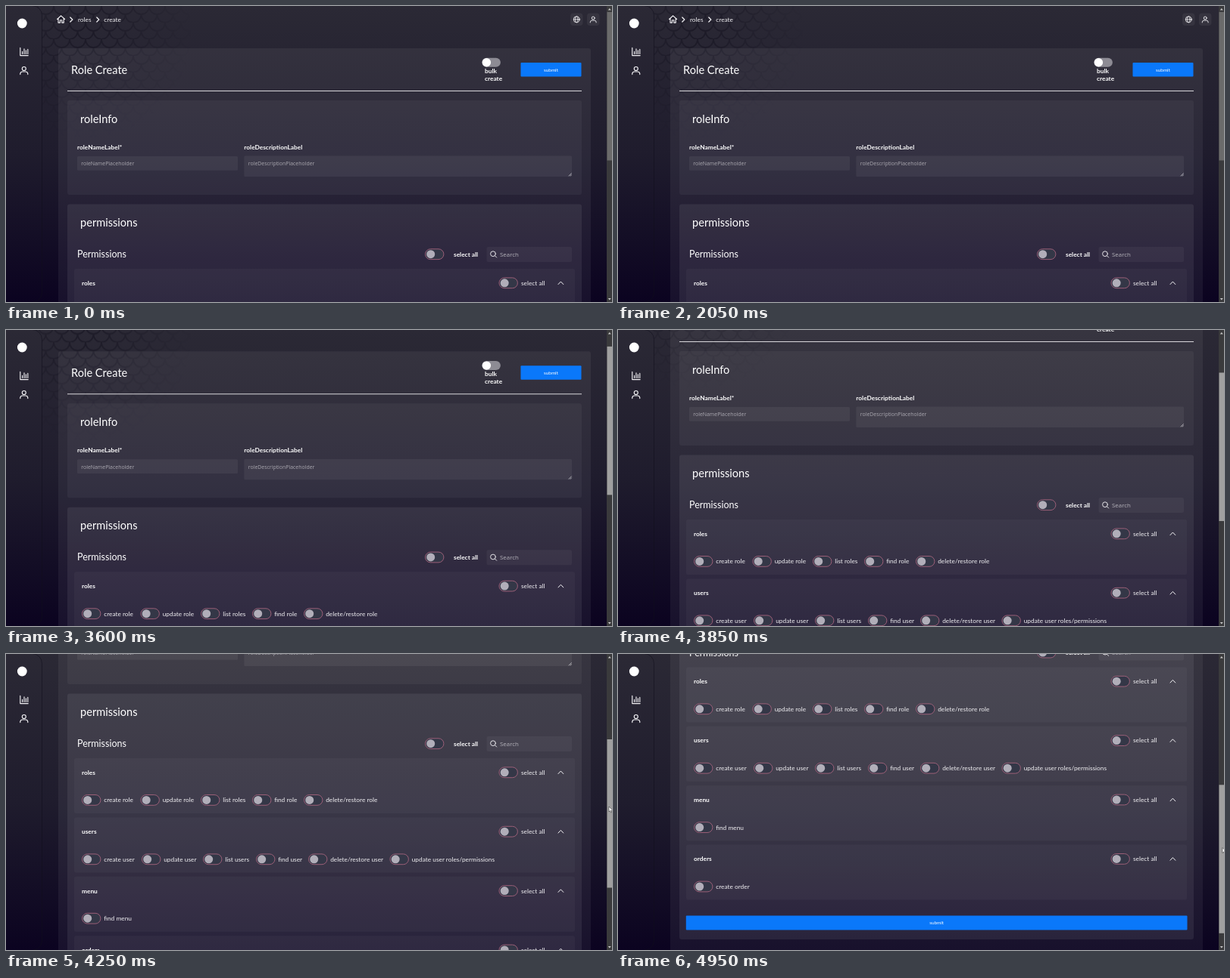
An HTML page that plays this animation: 800x392 px, repeating every 5 s.

```html
<!DOCTYPE html>
<html lang="en">
<head>
<meta charset="utf-8">
<title>Role Create</title>
<style>
  html, body { margin: 0; width: 100%; height: 100%; overflow: hidden; background: #1e1b2c; }
  svg { display: block; width: 800px; height: 392px; }
  text { font: 8.33px Lato, sans-serif; fill: #f1f0f3; white-space: pre; }
  .b { font-weight: 700; fill: #fff; }
  .h { font-size: 14.6px; fill: #fff; }
  .h2 { font-size: 12.5px; fill: #fff; }
  .ph { font: 6.93px "Open Sans", sans-serif; fill: #aaa8b0; }
  .find { font: 7.9px "Open Sans", sans-serif; fill: #b4b2ba; }
  .btn { font-size: 6.35px; fill: #fff; text-anchor: middle; }
  .line { fill: none; stroke: #f4f3f6; stroke-width: 1.15; stroke-linecap: round; stroke-linejoin: round; }
</style>
</head>
<body>
<svg viewBox="0 0 800 392">
  <defs>
    <linearGradient id="bg" gradientUnits="userSpaceOnUse" x1="0" y1="0" x2="0" y2="392">
      <stop offset="0" stop-color="#2b2935"/>
      <stop offset=".5" stop-color="#1f1c2d"/>
      <stop offset="1" stop-color="#0b0320"/>
    </linearGradient>
    <radialGradient id="fade" gradientUnits="userSpaceOnUse" cx="105" cy="35" r="140">
      <stop offset="0" stop-color="#fff"/>
      <stop offset="1" stop-color="#000"/>
    </radialGradient>
    <mask id="soft"><rect width="260" height="190" fill="url(#fade)"/></mask>
    <pattern id="scales" width="21" height="22" patternUnits="userSpaceOnUse">
      <path d="M0 0a10.5 11 0 0 0 21 0M-10.5 11a10.5 11 0 0 0 21 0M10.5 11a10.5 11 0 0 0 21 0"
        fill="none" stroke="#14121f" stroke-width="1.8"/>
    </pattern>
  </defs>
  <rect width="800" height="392" fill="url(#bg)"/>
  <g id="page"></g>
  <g id="fixed"></g>
  <rect id="thumb" x="793.5" y="8" width="6.5" height="196.5"/>
  <path id="cursor" d="M0 0v7l1.6-1.5 1.1 2.5 1.2-.5-1.1-2.4h2.2z" fill="#fff" stroke="#222" stroke-width=".5"/>
</svg>
<script>
const LOOP = 5000, STEP = 50, DRAG_START = 3500;
const $ = id => document.getElementById(id);

const rect = (x, y, w, h, fill, r = 2.5) =>
  `<rect x="${x}" y="${y}" width="${w}" height="${h}" rx="${r}" fill="${fill}"/>`;
const glass = (x, y, w, h, a, r) => rect(x, y, w, h, `rgba(255,255,255,${a})`, r);
const text = (s, x, y, cls = "") => `<text x="${x}" y="${y}" class="${cls}">${s}</text>`;
const line = (d, w = 1.15) => `<path class="line" d="${d}" style="stroke-width:${w}"/>`;
const toggle = (x, y) =>
  `<rect x="${x + .5}" y="${y - 6.9}" width="24.4" height="13.8" rx="6.9" fill="#343747" stroke="#a5647d" stroke-width=".9"/>
   <circle cx="${x + 7.7}" cy="${y}" r="5.5" fill="#b1aeb9"/>`;
const person = (x, y, s = 1) =>
  `<g transform="translate(${x} ${y}) scale(${s})"><circle class="line" cy="-2.6" r="2.5"/>${line("M-5 5v-1a3 3 0 0 1 3-2.6h4a3 3 0 0 1 3 2.6v1")}</g>`;

const groups = [
  ["roles", [[100, "create role"], [177.5, "update role"], [257, "list roles"], [325, "find role"], [393, "delete/restore role"]]],
  ["users", [[100, "create user"], [179, "update user"], [260, "list users"], [330, "find user"], [399, "delete/restore user"], [506.5, "update user roles/permissions"]]],
  ["menu", [[100, "find menu"]]],
  ["orders", [[100, "create order"]]]
];

const group = ([name, items], i) => {
  const y = 348 + i * 78.4;
  return glass(90, y, 661, 73, .032) +
    text(name, 100, y + 21.7, "b") +
    toggle(650.5, y + 18.8) + text("select all", 680, y + 21.7) +
    line(`M729 ${y + 20.6}l3.4-3.6 3.4 3.6`, 1) +
    items.map(([x, s]) => toggle(x, y + 55.4) + text(s, x + 29.2, y + 58.4)).join("");
};

const header =
  `<rect width="260" height="190" fill="url(#scales)" mask="url(#soft)" opacity=".6"/>` +
  line("M67.6 17.5l5-4.6 5 4.6M69 16.5v5.6h2.4v-3.4h2.4v3.4h2.4v-5.6") +
  line("M84.8 15l3 3-3 3M119.8 15l3 3-3 3", 1.2) +
  text("roles", 95, 21) + text("create", 129.3, 21) +
  glass(745, 9.5, 16.5, 16.5, .06, 4) + glass(767, 9.5, 16.5, 16.5, .06, 4) +
  `<circle class="line" cx="753.3" cy="17.8" r="4" style="stroke-width:.9"/>` +
  `<ellipse class="line" cx="753.3" cy="17.8" rx="1.8" ry="4" style="stroke-width:.8"/>` +
  line("M749.3 17.8h8", .8) + person(775.2, 18, .78);

const form =
  glass(69, 56, 703, 690, .055, 3) +
  text("Role Create", 86, 89.8, "h") +
  rect(628.3, 68.8, 24.6, 12, "#8d8b94", 6) + `<circle cx="634.4" cy="74.8" r="5.7" fill="#fff"/>` +
  text("bulk", 632, 89, "b") + text("create", 632, 98.5, "b") +
  rect(679.5, 75, 80, 18.4, "#0a78fa", 1) + text("submit", 719.5, 86.6, "btn") +
  rect(81, 112, 679, 1, "#d8d7db", 0) +
  glass(81, 125, 679, 125, .045, 3) +
  text("roleInfo", 98, 155, "h") +
  text("roleNameLabel*", 94, 190, "b") + text("roleDescriptionLabel", 314.3, 190, "b") +
  glass(94, 199, 212, 18.8, .055, 1.5) + text("roleNamePlaceholder", 99.3, 211.4, "ph") +
  glass(314.3, 198.6, 432.7, 27.4, .055, 1.5) + text("roleDescriptionPlaceholder", 319.8, 211.4, "ph") +
  line("M743 225l3.4-3.4M745 225l1.4-1.4", .6);

const permissions =
  glass(81, 262.5, 679, 446, .07, 3) +
  text("permissions", 98, 292, "h") +
  text("Permissions", 94, 333.2, "h2") +
  toggle(553, 328.7) + text("select all", 591, 331.8, "b") +
  glass(634.5, 319, 112.5, 20, .045, 2.5) +
  `<circle class="line" cx="643" cy="328.2" r="3.4" style="stroke-width:.9"/>` + line("M645.5 330.8l2.2 2.2", .9) +
  text("Search", 652, 331.8, "find") +
  groups.map(group).join("") +
  rect(89.8, 677, 661.7, 19, "#0a78fa", 1) + text("submit", 420.6, 688.8, "btn");

$("page").innerHTML = header + form + permissions;

$("fixed").innerHTML =
  `<rect x="-20" y="-.5" width="67.5" height="393" rx="13" fill="url(#bg)" stroke="#12101d" stroke-opacity=".55"/>` +
  `<circle cx="21.3" cy="23" r="6.4" fill="#fff"/>` +
  line("M18.8 55.4v10.2h10.4M21.6 63.4v-3M24 63.4v-6.6M26.4 63.4v-4.6M28.8 63.4v-6") +
  person(23.8, 85.6) +
  rect(793, 0, 7, 392, "#3a3a3c", 0) +
  `<path d="M794.8 5.4l2-2.4 2 2.4zM794.8 387l2 2.4 2-2.4z" fill="#c8c8c8"/>`;

// [time, scroll] and [time, x, y]
const scrollKeys = [[DRAG_START, 0], [3850, 97], [4250, 210], [4650, 263.6], [4950, 330.6]];
const cursorKeys = [[3850, 802, 147], [4250, 796, 202], [4650, 788, 219.5], [4950, 798, 256.5]];

function at(keys, t) {
  if (t <= keys[0][0]) return keys[0].slice(1);
  for (let i = 1; i < keys.length; i++) {
    const [a, b] = [keys[i - 1], keys[i]];
    if (t <= b[0]) {
      const k = (t - a[0]) / (b[0] - a[0]);
      return a.slice(1).map((v, j) => v + (b[j + 1] - v) * k);
    }
  }
  return keys[keys.length - 1].slice(1);
}

function draw(now) {
  const t = Math.floor(now % LOOP / STEP) * STEP;
  const [scroll] = at(scrollKeys, t);
  const [x, y] = at(cursorKeys, t);
  $("page").setAttribute("transform", `translate(0 ${-scroll})`);
  $("thumb").setAttribute("y", 8 + scroll / 2);
  $("thumb").setAttribute("fill", t > DRAG_START ? "#a0a0a0" : "#6b6b6b");
  $("cursor").setAttribute("transform", `translate(${x} ${y})`);
}

const start = performance.now();
function tick() {
  draw(performance.now() - start);
  requestAnimationFrame(tick);
}
tick();
</script>
</body>
</html>
```
